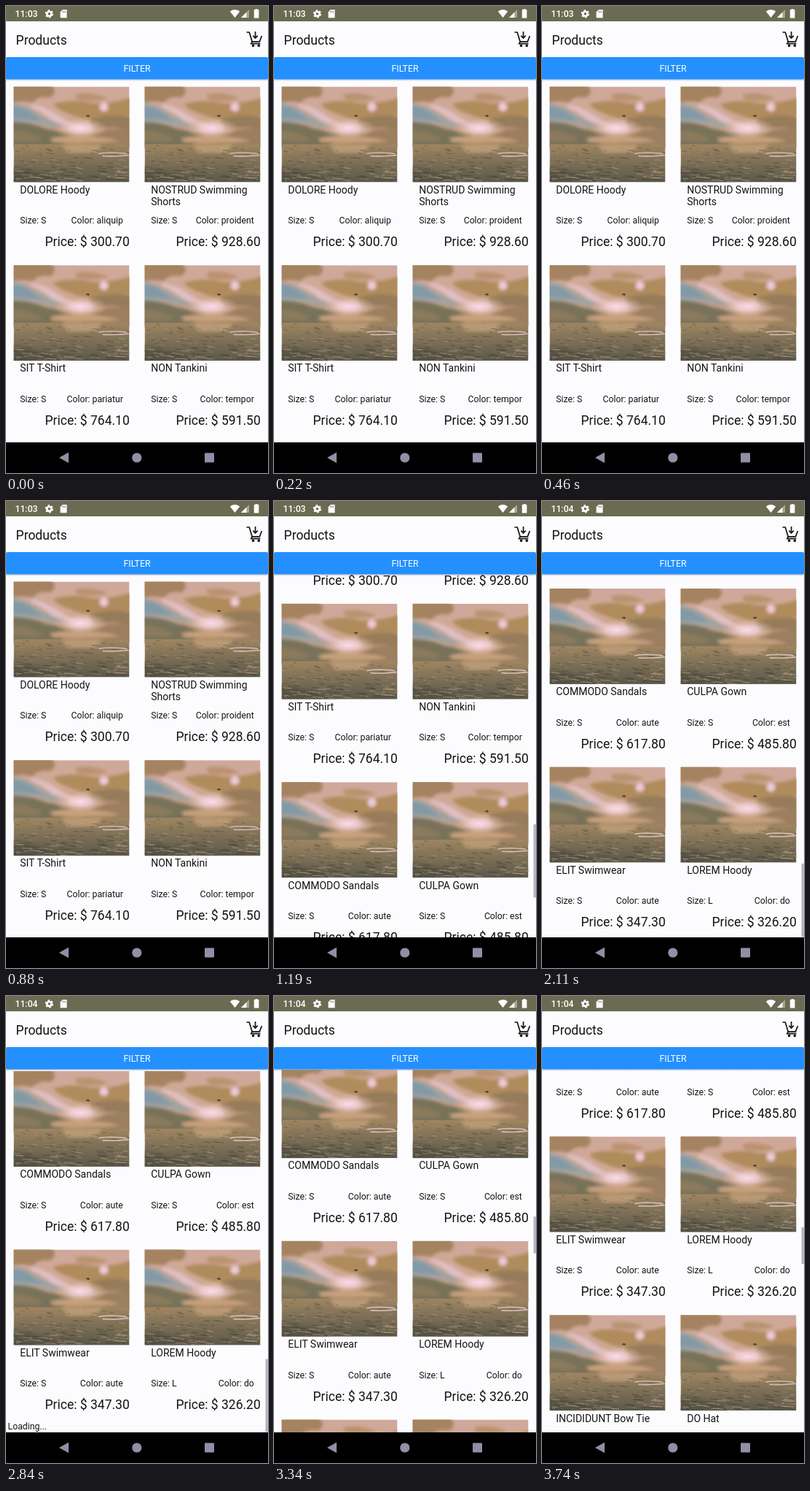
An HTML page that plays this animation: 360 by 640 pixels, repeating every 3.76 s.

```html
<!DOCTYPE html>
<html lang="en">
<head>
<meta charset="utf-8">
<title>Products</title>
<style>
html, body { margin: 0; width: 100%; height: 100%; overflow: hidden; background: #fcfcfe; }
svg { display: block; width: 100vw; height: 100vh; }
text { font-family: Roboto, sans-serif; fill: #141414; white-space: pre; }
.title, .price { font-size: 17.5px; }
.name { font-size: 14px; }
.small { font-size: 12.26px; }
.end { text-anchor: end; }
</style>
</head>
<body>
<svg viewBox="0 0 360 640">
  <defs>
    <clipPath id="listClip"><rect y="101" width="360" height="497"/></clipPath>
    <clipPath id="photoClip"><rect width="159" height="131"/></clipPath>
    <filter id="soft" x="-10%" y="-10%" width="120%" height="120%"><feGaussianBlur stdDeviation="2"/></filter>
    <linearGradient id="sky" x2="0" y2="1">
      <stop offset="0" stop-color="#d0a89c"/><stop offset=".5" stop-color="#cfa893"/><stop offset="1" stop-color="#a8845f"/>
    </linearGradient>
    <linearGradient id="sea" x2="0" y2="1">
      <stop offset="0" stop-color="#a08560"/><stop offset=".35" stop-color="#857559"/><stop offset="1" stop-color="#5b584a"/>
    </linearGradient>
    <linearGradient id="shade" x2="0" y2="1">
      <stop offset="0" stop-color="#777" stop-opacity=".6"/><stop offset="1" stop-color="#999" stop-opacity="0"/>
    </linearGradient>
    <radialGradient id="glow">
      <stop offset="0" stop-color="#fbdcf0"/><stop offset=".4" stop-color="#f2cfd4" stop-opacity=".8"/><stop offset="1" stop-color="#d8b090" stop-opacity="0"/>
    </radialGradient>
    <g id="photo" clip-path="url(#photoClip)">
      <rect width="159" height="82" fill="url(#sky)"/>
      <g filter="url(#soft)">
        <path d="M-5-5H48Q64 6 50 15 34 12 26 22 10 18-5 23Z" fill="#a58360"/>
        <path d="M-5 22Q18 24 36 38 52 46 72 56 50 58 30 50L-5 48Z" fill="#a3a3a0"/>
        <path d="M-5 26Q12 26 24 36 36 44 40 48 20 44-5 44Z" fill="#829aa6"/>
        <path d="M24 24Q44 27 62 40 80 50 92 56 72 56 52 46 40 34 24 28Z" fill="#e0bfc4"/>
        <path d="M54 24Q80 16 108 23 138 24 164 14V40Q138 40 116 45 94 46 76 37 62 33 54 24Z" fill="#b08b5c"/>
        <path d="M104 46Q128 36 164 42V62Q140 52 108 59Z" fill="#967c5a"/>
        <path d="M84 11Q104 5 130 16 112 22 88 18Z" fill="#b99370"/>
        <circle cx="124" cy="28" r="6" fill="#ecc9d6"/>
        <path d="M-5 48Q24 48 44 58 64 62 82 66 76 76 60 84H-5Z" fill="#78725a"/>
        <path d="M-5 60Q20 60 40 72L30 76-5 74Z" fill="#8b7a5c"/>
        <path d="M108 65Q130 56 164 58V84H90Z" fill="#9c7f60"/>
        <path d="M50 71Q84 64 116 69 136 71 146 75 100 79 54 76Z" fill="#c6a07c"/>
      </g>
      <ellipse cx="92" cy="57" rx="38" ry="15" fill="url(#glow)"/>
      <path d="M99 40L102 38.5 105 40 103 41.5 101 41Z" fill="#4a4238"/>
      <rect y="79" width="159" height="52" fill="url(#sea)"/>
      <path d="M66 79H122L112 91H74Z" fill="#d0aa84" opacity=".6" filter="url(#soft)"/>
      <path d="M-5 108Q28 116 62 125L84 136H-5Z" fill="#4e4c40" opacity=".5" filter="url(#soft)"/>
      <g id="waves" fill="none" stroke-width="1.1"/>
      <path d="M117 92Q130 89 156 92M122 95Q138 96 158 94" fill="none" stroke="#d6bdb6" stroke-width="1.6"/>
    </g>
  </defs>

  <rect width="360" height="640" fill="#fcfcfe"/>
  <g clip-path="url(#listClip)">
    <g id="list"></g>
    <rect id="bar" x="356.5" width="3.5" fill="#b7b4c4"/>
  </g>

  <rect y="21" width="360" height="50" fill="#fcfcfe"/>
  <rect y="99" width="360" height="4.5" fill="url(#shade)"/>
  <rect y="70" width="360" height="30.5" rx="2" fill="#2490ff"/>
  <text class="small" x="180" y="90.3" text-anchor="middle" style="fill:#fff">FILTER</text>
  <text class="title" x="13.6" y="52.6">Products</text>
  <g fill="none" stroke="#151515" stroke-width="1.7">
    <path d="M330.5 36H334.3L338.2 48.8H348.4L351.5 41"/>
    <path d="M338.2 48.8L336.8 51.6H349.5M342.6 35V43.5M339.4 40.6L342.6 44 345.8 40.6"/>
  </g>
  <g fill="#151515"><circle cx="339.6" cy="54.4" r="1.8"/><circle cx="347.3" cy="54.4" r="1.8"/></g>

  <rect width="360" height="21" fill="#6b6b53"/>
  <text id="clock" x="12.4" y="15.2" style="fill:#fff;font-size:12.3px;font-weight:500"></text>
  <g fill="#fff">
    <circle cx="59.4" cy="10.8" r="3.1" fill="none" stroke="#fff" stroke-width="2.6"/>
    <circle cx="59.4" cy="10.8" r="4.9" fill="none" stroke="#fff" stroke-width="1.6" stroke-dasharray="2.6 2.53"/>
    <path d="M77.8 5H83.6V16.2H74.6V8.2Z"/>
    <path d="M307.8 7.4Q314.5 2.6 321.2 7.4L314.5 16Z"/>
    <path d="M334 5V16H323Z" opacity=".4"/><path d="M330.4 8.6V16H323Z"/>
    <path d="M342.6 5V4H345.6V5H347.4V16.6H340.8V5Z"/>
  </g>
  <path d="M77.8 6.5V9M79.7 6.5V9M81.6 6.5V9" stroke="#6b6b53" stroke-width=".8"/>

  <rect y="598" width="360" height="42" fill="#000"/>
  <g fill="#8f8fa6">
    <path d="M73 619L86 611.8V626.2Z"/><circle cx="179.8" cy="619" r="6.6"/><rect x="273" y="612.4" width="13" height="13" rx="1"/>
  </g>
</svg>
<script>
const LOOP = 3760, PITCH = 244.7, VIEW = 496, ROWS_ABOVE = 6;
const LOADING_AT = 2280, LOADED_AT = 3020, CLOCK_AT = 1640;
const FOOTER = 17;

// name, size, colour, price
const items = [
  ["DOLORE Hoody", "S", "aliquip", "300.70"],
  ["NOSTRUD Swimming|Shorts", "S", "proident", "928.60"],
  ["SIT T-Shirt", "S", "pariatur", "764.10"],
  ["NON Tankini", "S", "tempor", "591.50"],
  ["COMMODO Sandals", "S", "aute", "617.80"],
  ["CULPA Gown", "S", "est", "485.80"],
  ["ELIT Swimwear", "S", "aute", "347.30"],
  ["LOREM Hoody", "L", "do", "326.20"],
  ["INCIDIDUNT Bow Tie"],
  ["DO Hat"]
];

const $ = id => document.getElementById(id);
const label = (cls, x, y, s) => `<text class="${cls}" x="${x}" y="${y}">${s}</text>`;

function card([name, size, color, price], i) {
  const x = i % 2 * 180, y = Math.floor(i / 2) * PITCH;
  let s = `<use href="#photo" x="10.5" y="110.5"/>`;
  name.split("|").forEach((line, n) => s += label("name", 19.2, 256.8 + n * 16.4, line));
  if (price) {
    s += label("small", 19.2, 298.3, "Size: " + size) +
      label("small end", 160.8, 298.3, "Color: " + color) +
      label("price end", 169.8, 329.2, "Price: $ " + price);
  }
  return `<g transform="translate(${x} ${y})">${s}</g>`;
}

// Ripples grow longer and darker towards the shore.
function drawWaves() {
  let seed = 7, s = "";
  const rnd = () => (seed = seed * 16807 % 2147483647) / 2147483647;
  const tones = ["#b59a80", "#4f4c40", "#9c8466", "#454339"];
  for (let i = 0; i < 150; i++) {
    const depth = rnd(), x = rnd() * 165 - 6, y = 81 + depth * 49, w = 3 + rnd() * (5 + depth * 9);
    s += `<path d="M${x} ${y}q${w / 2} ${rnd() * 3 - 1} ${w} 1" stroke="${tones[i % 4]}" opacity="${0.4 + depth * 0.35}"/>`;
  }
  $("waves").innerHTML = s;
}

drawWaves();
$("list").innerHTML = items.slice(0, 8).map(card).join("") +
  `<g id="more">${items.slice(8).map((it, i) => card(it, i + 8)).join("")}</g>` +
  `<text id="loading" class="small" x="2.6" y="${594 + 497}">Loading...</text>`;

const clamp = u => Math.min(1, Math.max(0, u));
const ramp = (t, a, b) => clamp((t - a) / (b - a));
const easeOut = u => 1 - (1 - u) ** 3;
const easeInOut = u => u * u * (3 - 2 * u);

const scrollAt = t =>
  480 * easeOut(ramp(t, 1060, 1791)) +
  FOOTER * easeOut(ramp(t, 2480, 2760)) +
  155 * easeInOut(ramp(t, 3260, 3740));

function barAlpha(t) {
  if (t < 1060) return 0;
  if (t < 2480) return 1 - ramp(t, 2150, 2400);
  if (t < 3260) return 1 - ramp(t, 2960, 3200);
  return 1;
}

function render(t) {
  const y = scrollAt(t), loaded = t >= LOADED_AT, loading = t >= LOADING_AT && !loaded;
  const height = PITCH * (loaded ? 20 : 10) + (loading ? FOOTER : 0);
  const top = (ROWS_ABOVE * PITCH + y) * VIEW / height;
  $("list").setAttribute("transform", `translate(0 ${-y})`);
  $("more").setAttribute("visibility", loaded ? "visible" : "hidden");
  $("loading").setAttribute("visibility", loading ? "visible" : "hidden");
  $("bar").setAttribute("y", 102 + top);
  $("bar").setAttribute("height", VIEW * VIEW / height);
  $("bar").setAttribute("opacity", barAlpha(t));
  $("clock").textContent = t < CLOCK_AT ? "11:03" : "11:04";
}

const start = performance.now();
function tick() {
  render((performance.now() - start) % LOOP);
  requestAnimationFrame(tick);
}
tick();
</script>
</body>
</html>
```
